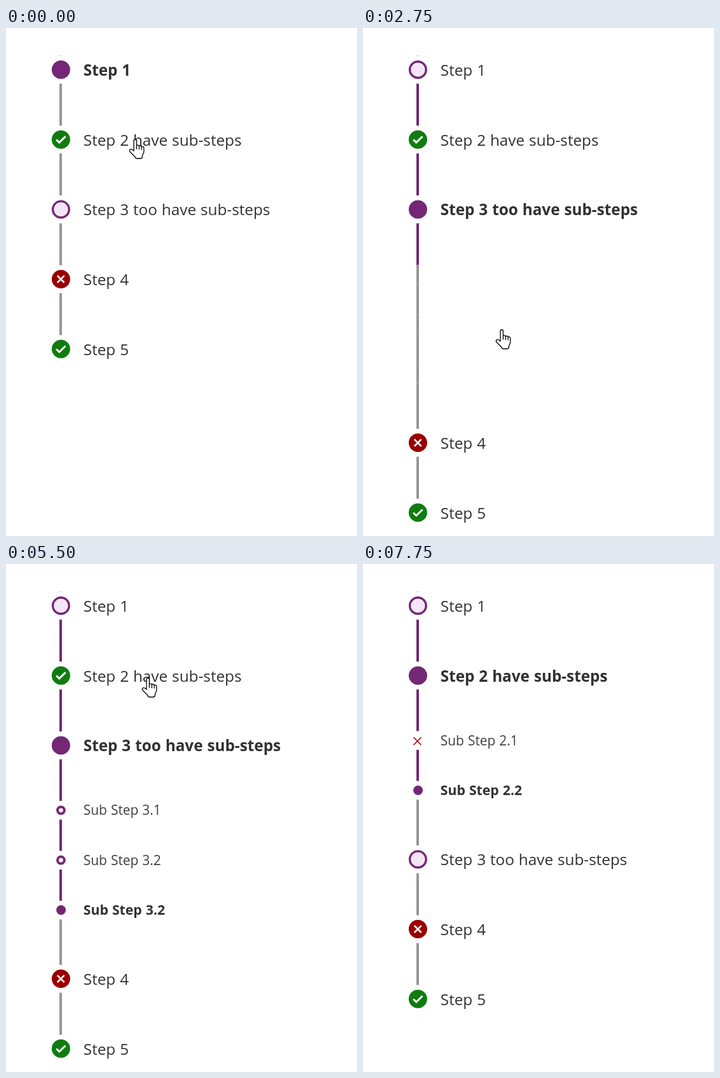
Recreate the animation shown at these times as an HTML page. Size 552 by 798 pixels, loop 8.25 s.

```html
<!DOCTYPE html>
<html lang="en">
<head>
<meta charset="utf-8">
<title>Vertical stepper</title>
<style>
html, body { margin: 0; width: 100%; height: 100%; overflow: hidden; background: #fff; }
svg { display: block; width: 552px; height: 798px; }
text { font-family: "Open Sans", "Noto Sans", sans-serif; fill: #323130; word-spacing: .6px; }
.step { font-size: 24.3px; }
.sub { font-size: 20.9px; }
.bold { font-weight: 700; }
.sub.bold { font-size: 21.2px; }
.sub:not(.bold) { fill: #403f3e; }
.line { fill: none; }
</style>
</head>
<body>
<svg viewBox="0 0 552 798" role="img" aria-label="Vertical stepper">
  <rect x="84" y="43" width="4" height="1" fill="#cfcdcf"/>
  <g id="stepper"></g>
  <g id="hand" stroke="#000" stroke-width="1.3" stroke-linejoin="round" stroke-linecap="round">
    <path fill="#fff" d="M8 19V3.2a2.2 2.2 0 0 1 4.4 0V10.6q2-1.6 4 .6q2.4-1.2 3.8 1q3-.8 3.6 2.4V21l-2.4 5.5V28q0 3-3 3H13q-3 0-3-2.5L2 20.5q-1.6-2.6 .6-4q2.2-.8 5.4 2.5z"/>
    <path fill="none" d="M12.4 10.6V16M16.4 11.2V16.5M20.2 12.2V17"/>
  </g>
</svg>
<script>
const LOOP = 8250;
const PURPLE = '#742774', PALE = '#f6e5f8', GRAY = '#979593', GREEN = '#107c10', RED = '#990000';

const steps = [
  { text: 'Step 1', kind: 'open' },
  { text: 'Step 2 have sub-steps', kind: 'done', subs: [
    { text: 'Sub Step 2.1', kind: 'error' },
    { text: 'Sub Step 2.2', kind: 'done' }] },
  { text: 'Step 3 too have sub-steps', kind: 'open', subs: [
    { text: 'Sub Step 3.1', kind: 'open' },
    { text: 'Sub Step 3.2', kind: 'open' },
    { text: 'Sub Step 3.2', kind: 'open' }] },
  { text: 'Step 4', kind: 'error' },
  { text: 'Step 5', kind: 'done' }
];

// Selected step and sub-step
const first = [0, -1], two1 = [1, 0], two2 = [1, 1], three1 = [2, 0], three3 = [2, 2];

// start, selection, label fade, sub-step fade, pointer x, pointer y
const scenes = [
  [0, first, 1, 1, 193, 174],
  [1000, two1, .6, 0, 193, 174],
  [1250, two1, 1, .5, 216, 262],
  [1500, two1, 1, 1, 215, 392],
  [1750, two1, 1, 1, 208, 461],
  [2000, two1, 1, 1, 208, 473],
  [2750, three1, 1, 0, 208, 473],
  [3000, three1, 1, .6, 208, 473],
  [3250, three1, 1, 1, 209, 465],
  [3500, three1, 1, 1, 214, 528],
  [3750, three1, 1, 1, 215, 560],
  [4250, three1, 1, 1, 209, 548],
  [4500, three3, .72, 1, 209, 548],
  [4750, three3, 1, 1, 209, 548],
  [5000, three3, 1, 1, 209, 512],
  [5250, three3, 1, 1, 214, 250],
  [5500, three3, 1, 1, 213, 178],
  [6000, two1, .88, 0, 213, 189],
  [6250, two1, 1, .5, 213, 192],
  [6500, two1, 1, 1, 208, 316],
  [6750, two1, 1, 1, 212, 364],
  [7000, two2, .72, 1, 212, 364],
  [7250, two2, 1, 1, 289, 544],
  [7500, two2, 1, 1, 281, 793],
  [7750, two2, 1, 1, 281, 850]
];

const circle = (x, y, r, fill, stroke = 'none', width = 3.4) =>
  `<circle cx="${x}" cy="${y}" r="${r}" fill="${fill}" stroke="${stroke}" stroke-width="${width}"/>`;
const line = (x, y, d, color, width) =>
  `<path class="line" transform="translate(${x} ${y})" d="${d}" stroke="${color}" stroke-width="${width}"/>`;
const bar = (top, bottom, color, opacity = 1) =>
  `<rect x="84" y="${top}" width="4" height="${bottom - top}" fill="${color}" opacity="${opacity}"/>`;

function stepIcon(y, kind) {
  if (kind === 'active') return circle(86.4, y, 14.5, PURPLE);
  if (kind === 'open') return circle(86.4, y, 12.8, PALE, PURPLE);
  if (kind === 'done')
    return circle(86.4, y, 14.5, GREEN) + line(86.4, y, 'M-7.2 .2L-2.6 4.7L7.2-4.8', '#fff', 2.9);
  return circle(86.4, y, 14.5, RED) + line(86.2, y, 'M-5.4-5.4L5.4 5.4M-5.4 5.4L5.4-5.4', '#fff', 2.6);
}

function subIcon(y, kind) {
  if (kind === 'active') return circle(86.6, y, 7.5, PURPLE);
  if (kind === 'open') return circle(86.4, y, 5.4, '#fdf6fd', PURPLE, 4);
  if (kind === 'done') return line(86, y, 'M-7 2L-3 6L6-3', GREEN, 1.6);
  return line(85.5, y + 1.1, 'M-6-6L6 6M-6 6L6-6', '#a80000', 1.6);
}

function label(node, bold) {
  const type = node.sub ? 'sub' : 'step';
  const y = Math.round(node.y + (node.sub ? 7.4 : 9.4));
  const draw = (cls, opacity) => opacity > 0
    ? `<text class="${type}${cls}" x="121.8" y="${y}" opacity="${opacity}">${node.text}</text>` : '';
  return draw('', 1 - bold) + draw(' bold', bold);
}

function layout([open]) {
  const nodes = [];
  let shift = 0;
  steps.forEach((step, i) => {
    const y = 65.5 + 109.7 * i + shift;
    nodes.push({ ...step, y, i, j: -1, gap: 21.9 });
    if (i !== open || !step.subs) return;
    step.subs.forEach((sub, j) =>
      nodes.push({ ...sub, y: y + 101.9 + 78.4 * j, i, j, sub: true, gap: 14.7 }));
    shift = 23 + 78 * step.subs.length;
  });
  return nodes;
}

const isActive = (n, [i, j]) => n.i === i && (!n.sub || n.j === j);

function draw(sel, prev, fade, subFade) {
  const nodes = layout(sel);
  const current = nodes.findIndex(n => n.i === sel[0] && n.j === sel[1]);
  let out = '';
  nodes.forEach((n, k) => {
    const next = nodes[k + 1];
    if (next) out += bar(n.y + n.gap, next.y - next.gap, k < current ? PURPLE : GRAY);
    if (n.sub && subFade < 1) out += bar(n.y - n.gap, n.y + n.gap, GRAY, 1 - subFade);

    const now = isActive(n, sel);
    // A sub-step hidden before the change has nothing to fade from
    const was = n.sub && prev[0] !== sel[0] ? now : isActive(n, prev);
    const bold = now * fade + was * (1 - fade);
    const active = now || (n.sub && was && fade < 1);
    const kind = active ? 'active' : n.kind;
    const body = (n.sub ? subIcon : stepIcon)(n.y, kind) + label(n, bold);
    out += n.sub ? `<g opacity="${subFade}">${body}</g>` : body;
  });
  return out;
}

const stepper = document.getElementById('stepper');
const hand = document.getElementById('hand');
let shown = -1;

function show(index) {
  const [, sel, fade, subFade, x, y] = scenes[index];
  const before = scenes.slice(0, index).reverse().find(s => s[1] !== sel);
  stepper.innerHTML = draw(sel, before ? before[1] : sel, fade, subFade);
  hand.setAttribute('transform', `translate(${x} ${y})`);
  shown = index;
}

function tick() {
  const t = performance.now() % LOOP;
  const index = scenes.filter(s => s[0] <= t).length - 1;
  if (index !== shown) show(index);
  requestAnimationFrame(tick);
}
tick();
</script>
</body>
</html>
```
